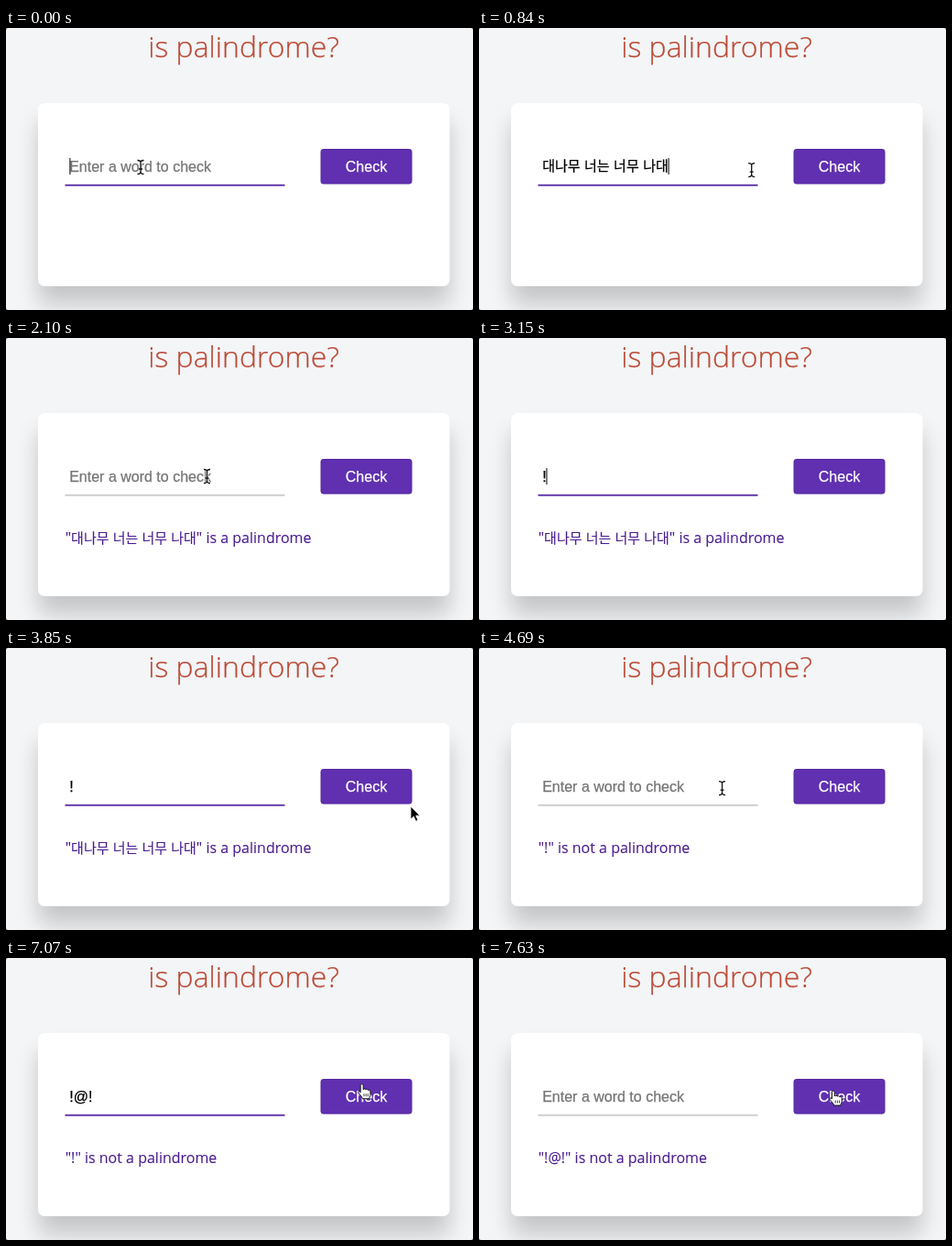
These frames come from a looping animation (510x308 px, 8260 ms). An HTML page:

```html
<!DOCTYPE html>
<html lang="en">
<head>
<meta charset="utf-8">
<title>is palindrome?</title>
<style>
  html, body { margin: 0; width: 100%; height: 100%; overflow: hidden; background: #55565a; }
  svg { display: block; width: 510px; height: 308px; }
  text { white-space: pre; fill: currentColor; stroke: currentColor; stroke-width: .25px; }
  .title { font: 300 32px "Open Sans", sans-serif; color: #bb4a35; text-anchor: middle; }
  .field, .button { font: 16px "Liberation Sans", Arial, sans-serif; }
  .button { color: #fff; text-anchor: middle; }
  .result { font: 16px "Open Sans", sans-serif; color: #4a1d90; stroke-width: .1px; }
  .ko { font-family: "Noto Sans CJK KR", "Noto Sans CJK", sans-serif; font-size: 15px; }
  .field .ko { baseline-shift: .8px; }
</style>
</head>
<body>
<svg viewBox="0 0 510 308">
  <defs>
    <filter id="soft" x="-20%" y="-30%" width="140%" height="170%">
      <feGaussianBlur stdDeviation="12"/>
    </filter>
  </defs>
  <rect width="510" height="308" rx="2.5" fill="#f3f5f7"/>
  <text class="title" x="259.5" y="32.2">is palindrome?</text>

  <rect x="35" y="102" width="449.5" height="200" rx="7" opacity=".19" filter="url(#soft)"/>
  <rect x="35" y="82" width="449.5" height="200" rx="7" fill="#fff"/>

  <rect id="line" x="64.5" y="170.8" width="240" height="1.8"/>
  <text id="field" class="field" x="69.2" y="156.5"></text>
  <rect id="caret" y="142" width="1" height="18"/>

  <rect x="344" y="132.5" width="99" height="37.5" rx="2.5" fill="#6030b0" stroke="#5428a0"/>
  <text class="button" x="393.5" y="156.5">Check</text>
  <text id="result" class="result" x="64.7" y="224"></text>

  <g id="cursor" stroke-linejoin="round">
    <g id="beam" fill="none">
      <path stroke="#fff" stroke-width="2.8" opacity=".8"/>
      <path stroke="#111" stroke-width="1.3"/>
    </g>
    <g id="hand" fill="#fff" stroke="#111">
      <path d="M-1.6 7V.6C-1.6-1.4 1.4-1.4 1.4.6V5C1.8 3.8 4 3.9 4.2 5.2 4.8 4.2 6.6 4.5 6.8 5.8 7.6 5 9.2 5.6 9.2 7.2V10.5C9.2 12 8 13 8 15H.6C.4 13-1.8 11.5-3.6 8.8-4.8 7-3 5.8-1.6 8Z"/>
      <path d="M2.2 9.5v3M4.4 9.5v3M6.5 9.5v3" stroke-width=".8"/>
    </g>
    <path id="arrow" d="M0 0V14.5L3.3 11.4 5.7 16.6 8.2 15.5 5.9 10.4H10.4Z" fill="#000" stroke="#fff"/>
  </g>
</svg>
<script>
const LOOP = 8260, STEP = 70, BLINK = 490, KEY_GAP = 170;

// each round: click the field, enter text, press the button
const rounds = [
  { focus: -280, key: 560, submit: 1540, text: "대나무 너는 너무 나대", pasted: true },
  { focus: 2380, key: 3150, submit: 4340, text: "!" },
  { focus: 5110, key: 5810, submit: 7490, text: "!@!" }
];

// pointer moves: each curves towards its bend and slows down at the end
const home = [147, 152];
const moves = [
  { start: 560, end: 1260, bend: [250, 164], to: [399, 146] },
  { start: 1680, end: 2100, bend: [400, 150], to: [219.5, 151] },
  { start: 3500, end: 4270, bend: [516, 209], to: [419, 146] },
  { start: 4410, end: 4830, bend: [414, 158], to: [226, 152] },
  { start: 6860, end: 7350, bend: [430, 128], to: [387, 146] }
];

const $ = id => document.getElementById(id);
const show = (el, on) => el.setAttribute("visibility", on ? "visible" : "hidden");
const isPalindrome = s => {
  const letters = s.replace(/[^a-z가-힣]/gi, "");
  return letters !== "" && letters === [...letters].reverse().join("");
};
const verdict = s => `"${s}" is ${isPalindrome(s) ? "a" : "not a"} palindrome`;

function typedText(round, t) {
  if (t < round.key) return "";
  return round.pasted ? round.text : round.text.slice(0, 1 + Math.floor((t - round.key) / KEY_GAP));
}

function caretOn(round, value, t) {
  const keys = round.pasted ? 1 : value.length;
  const since = value ? round.key + (keys - 1) * KEY_GAP : round.focus;
  return Math.floor((t - since) / BLINK) % 2 === 0;
}

function pointer(t) {
  const i = moves.findLastIndex(m => t > m.start);
  if (i < 0) return home;
  const { start, end, bend, to } = moves[i], from = i ? moves[i - 1].to : home;
  const u = 1 - Math.min(1, (t - start) / (end - start));
  const r = u * u, k = 1 - r;
  return to.map((v, j) => r * r * from[j] + 2 * r * k * bend[j] + k * k * v);
}

function shapeAt([x, y]) {
  if (x > 343 && x < 444 && y > 132 && y < 171) return "hand";
  if (x > 64 && x < 305 && y > 132 && y < 173) return "beam";
  return "arrow";
}

function setText(el, str) {
  if (el.dataset.str === str) return;
  el.dataset.str = str;
  el.replaceChildren(...str.split(/([가-힣]+)/).filter(Boolean).map(part => {
    const span = document.createElementNS("http://www.w3.org/2000/svg", "tspan");
    if (/[가-힣]/.test(part)) span.setAttribute("class", "ko");
    span.textContent = part;
    return span;
  }));
}

function draw(t) {
  const round = rounds.findLast(r => t >= r.focus);
  const done = rounds.findLast(r => t >= r.submit);
  const focused = round !== done;
  const value = focused ? typedText(round, t) : "";

  setText($("field"), value || "Enter a word to check");
  $("field").style.color = value ? "#000" : "#757575";
  setText($("result"), done ? verdict(done.text) : "");
  $("line").setAttribute("fill", focused ? "#5527a5" : "#cacaca");
  $("caret").setAttribute("x", 69 + (value ? $("field").getComputedTextLength() : 0.4));
  show($("caret"), focused && caretOn(round, value, t));

  // typing hides the pointer until it moves again
  const moved = moves.findLast(m => t > m.start);
  const hidden = value && round.key > (moved ? moved.start : 0);
  const pos = pointer(t), shape = shapeAt(pos);
  $("cursor").setAttribute("transform", `translate(${pos})`);
  for (const id of ["beam", "hand", "arrow"]) show($(id), !hidden && id === shape);
}

const beam = "M-3.5-7.5Q0-7.5 0-5Q0-7.5 3.5-7.5M0-5V5M-2 2H2M-3.5 7.5Q0 7.5 0 5Q0 7.5 3.5 7.5";
for (const p of $("beam").children) p.setAttribute("d", beam);

const start = performance.now();
function tick() {
  const t = (performance.now() - start) % LOOP;
  draw(Math.floor(t / STEP) * STEP);
  requestAnimationFrame(tick);
}
tick();
</script>
</body>
</html>
```
